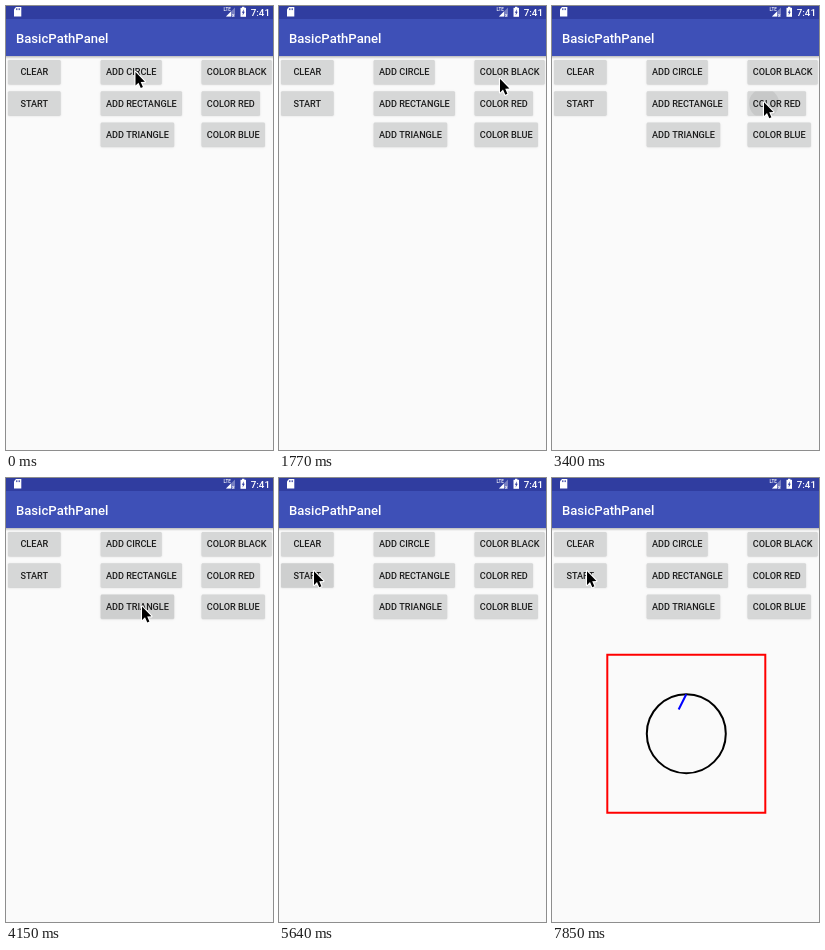
Recreate the animation shown at these times as an HTML page with a canvas. Size 267 by 444 pixels, loop 7990 ms.

```html
<!DOCTYPE html>
<html lang="en">
<head>
<meta charset="utf-8">
<title>Line drawing demo</title>
<style>
html, body { margin: 0; width: 100%; height: 100%; overflow: hidden; background: #fafafa; }
canvas { display: block; width: 267px; height: 444px; }
</style>
</head>
<body>
<canvas id="stage" width="267" height="444"></canvas>
<script>
const ctx = document.getElementById('stage').getContext('2d');
const LOOP = 7990, TICK = LOOP / 54;
const DRAW_START = 5676, SHAPE_TIME = 1048;
const BAR = '#3e50b7', STATUS = '#303da0';
const BUTTON_H = 24.2, ROW = 31.3;

const columns = [
  { x: 2, labels: ['CLEAR', 'START'] },
  { x: 94.7, labels: ['ADD CIRCLE', 'ADD RECTANGLE', 'ADD TRIANGLE'] },
  { x: 195.6, labels: ['COLOR BLACK', 'COLOR RED', 'COLOR BLUE'] }
];

// Pointer stops; arrive and press are counted in ticks
const stops = [
  { x: 129.5, y: 66, arrive: 0, press: 0 },
  { x: 127.5, y: 66, arrive: 3, press: 8, label: 'ADD CIRCLE' },
  { x: 221, y: 72.8, arrive: 12, press: 14, label: 'COLOR BLACK' },
  { x: 148, y: 101.8, arrive: 17, press: 19, label: 'ADD RECTANGLE' },
  { x: 212, y: 96.3, arrive: 22, press: 23, label: 'COLOR RED' },
  { x: 136, y: 128.5, arrive: 26, press: 27, label: 'ADD TRIANGLE' },
  { x: 219, y: 129.3, arrive: 31, press: 33, label: 'COLOR BLUE', full: true },
  { x: 35, y: 93.3, arrive: 36, press: 37, label: 'START' }
];

const smooth = u => u * u * (3 - 2 * u);

function pointerAt(tick) {
  const i = stops.findIndex(s => s.arrive > tick);
  if (i < 0) return stops[stops.length - 1];
  const from = stops[i - 1], to = stops[i], leave = from.press + 1;
  const u = smooth(Math.max(0, (tick - leave) / (to.arrive - leave)));
  return { x: from.x + (to.x - from.x) * u, y: from.y + (to.y - from.y) * u };
}

function box(x, y, w, h, color) {
  ctx.fillStyle = color;
  ctx.fillRect(x, y, w, h);
}

function poly(points, color) {
  ctx.beginPath();
  points.forEach(([x, y]) => ctx.lineTo(x, y));
  ctx.closePath();
  ctx.fillStyle = color;
  ctx.fill();
}

function label(text, x, y, size, color, align = 'left') {
  ctx.font = `500 ${size}px Roboto, sans-serif`;
  ctx.textAlign = align;
  ctx.fillStyle = color;
  ctx.fillText(text, x, y);
  return ctx.measureText(text).width;
}

function drawBars() {
  const shade = ctx.createLinearGradient(0, 50, 0, 53);
  shade.addColorStop(0, 'rgba(0,0,0,.25)');
  shade.addColorStop(1, 'rgba(0,0,0,0)');
  box(0, 50, 267, 3, shade);
  box(0, 0, 267, 13, STATUS);
  box(0, 13, 267, 37, BAR);
  label('BasicPathPanel', 10, 36.8, 13.1, '#fff');

  // Memory card
  poly([[10, 1], [15.3, 1], [15.3, 10.5], [8, 10.5], [8, 3.2]], '#fff');
  for (let i = 0; i < 3; i++) box(10 + i * 1.6, 2.3, .8, 1.8, STATUS);

  // Signal
  label('LTE', 217.5, 5, 4.6, '#fff');
  poly([[229, 1.5], [229, 10.5], [220, 10.5]], 'rgba(255,255,255,.35)');
  poly([[225, 5.5], [225, 10.5], [220, 10.5]], '#fff');
  label('x', 226, 10.5, 5, '#fff');

  // Battery
  box(236, .8, 2.4, 1.2, '#fff');
  box(234.5, 1.8, 5.5, 9, '#fff');
  poly([[238, 3.2], [235.8, 6.8], [237, 6.8], [236.6, 9.4], [238.8, 5.8], [237.6, 5.8]], STATUS);
  label('7:41', 264, 9.8, 9.8, '#fff', 'right');
}

function drawRipple(stop, tick) {
  const age = tick - stop.press;
  if (age < 0 || age > 1) return;
  ctx.beginPath();
  ctx.arc(stop.x, stop.y + 1, (stop.full ? 70 : 15) + age * 28, 0, 7);
  ctx.fillStyle = `rgba(0,0,0,${(stop.full ? .14 : .07) * (1 - age / 2)})`;
  ctx.fill();
}

function drawButton(text, x, y, tick) {
  ctx.font = '500 9.15px Roboto, sans-serif';
  const width = Math.max(52.6, ctx.measureText(text).width + 10.4);
  ctx.save();
  ctx.beginPath();
  ctx.roundRect(x, y, width, BUTTON_H, 1.3);
  ctx.shadowColor = 'rgba(0,0,0,.18)';
  ctx.shadowBlur = 1.5;
  ctx.shadowOffsetY = .5;
  ctx.fillStyle = '#d6d7d7';
  ctx.fill();
  ctx.shadowColor = 'transparent';
  ctx.clip();
  stops.filter(s => s.label === text).forEach(s => drawRipple(s, tick));
  ctx.restore();
  label(text, x + width / 2, y + 15.3, 9.15, '#1c1c1c', 'center');
}

// Strokes the first part of a path of known length
function trace(path, length, part, color) {
  if (part <= 0) return;
  ctx.setLineDash(part < 1 ? [length * part, length * 2] : []);
  ctx.strokeStyle = color;
  ctx.lineWidth = 2;
  ctx.stroke(path);
  ctx.setLineDash([]);
}

function drawShapes(progress) {
  const cx = 134.3, cy = 255.7, r = 39.5, half = r * 2;
  const circle = new Path2D(), square = new Path2D(), triangle = new Path2D();
  circle.arc(cx, cy, r, 0, Math.PI * 2);
  square.rect(cx - half, cy - half, half * 2, half * 2);
  triangle.moveTo(cx, cy - r);
  triangle.lineTo(cx - r, cy + r);
  triangle.lineTo(cx + r, cy + r);
  triangle.closePath();
  trace(circle, Math.PI * 2 * r, progress, '#000');
  trace(square, half * 8, progress - 1, '#f00');
  trace(triangle, r * (2 + 2 * Math.sqrt(5)), progress - 2, '#00f');
}

function drawPointer({ x, y }) {
  const outline = [[0, 0], [0, 13.6], [3, 10.8], [5.3, 15.9], [7.4, 15], [5.2, 10], [9.4, 9.8]];
  ctx.save();
  ctx.translate(x, y);
  ctx.lineJoin = 'round';
  ctx.lineWidth = 2.2;
  ctx.strokeStyle = '#fff';
  poly(outline, '#000');
  ctx.stroke();
  poly(outline, '#000');
  ctx.restore();
}

function render(now) {
  const tick = Math.floor((now % LOOP + 8) / TICK) % 54;
  box(0, 0, 267, 444, '#fafafa');
  drawBars();
  columns.forEach(({ x, labels }) =>
    labels.forEach((text, row) => drawButton(text, x, 54 + row * ROW, tick)));
  drawShapes((tick * TICK - DRAW_START) / SHAPE_TIME);
  drawPointer(pointerAt(tick));
}

const begin = performance.now();
function frame() {
  render(performance.now() - begin);
  requestAnimationFrame(frame);
}
frame();
</script>
</body>
</html>
```
